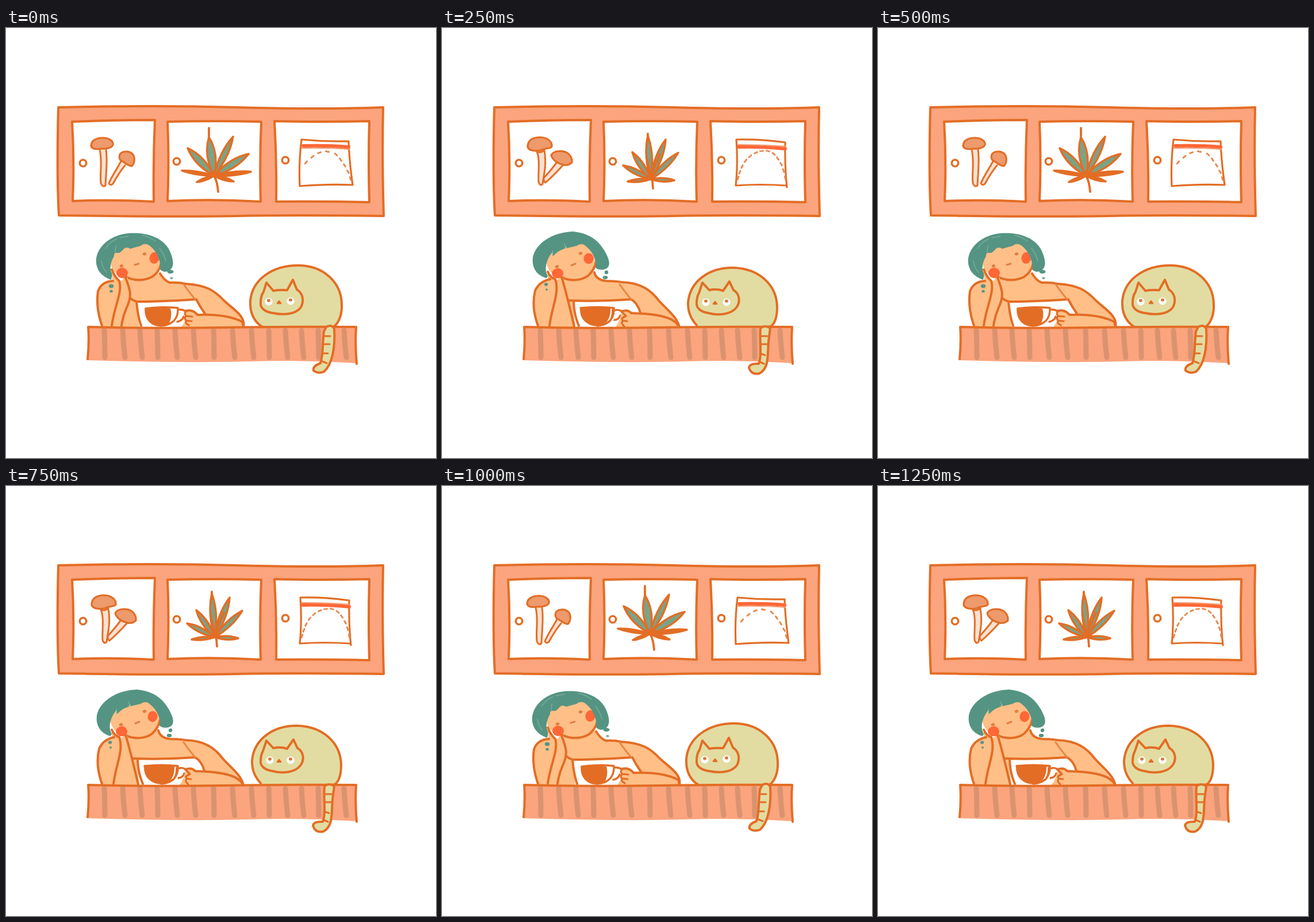
Write an HTML page that moves like this. It is 748x748 px and loops after 1500 ms.

```html
<!DOCTYPE html>
<html lang="en">
<head>
<meta charset="utf-8">
<title>Kitchen counter</title>
<style>
html, body { margin: 0; width: 100%; height: 100%; overflow: hidden; background: #fff; }
svg { display: block; width: 100vw; height: 100vh; }
</style>
</head>
<body>
<svg id="stage" viewBox="0 0 748 748" fill="none" stroke-linecap="round" stroke-linejoin="round"></svg>
<script>
const INK = '#e36d25', SALMON = '#fba47e', SKIN = '#ffbf87', HAIR = '#559482',
      CAT = '#e2dca2', RED = '#ff6737', CAP = '#ed9a6c', STEM = '#fde0d2',
      LEAF = '#7ba386', STRIPE = '#da936f';
const STEP = 250;

const path = (d, fill = 'none', stroke = INK, width = 4) =>
  `<path d="${d}" fill="${fill}" stroke="${stroke}" stroke-width="${width}"/>`;
const line = (d, width = 4, color = INK) => path(d, 'none', color, width);
const shape = (d, fill) => path(d, fill, 'none', 0);
const oval = (x, y, rx, ry, fill, tilt = 0) =>
  `<ellipse cx="${x}" cy="${y}" rx="${rx}" ry="${ry}" fill="${fill}" transform="rotate(${tilt} ${x} ${y})"/>`;

// A pointed leaflet from base to tip; w is the bulge on each side.
function leaflet([bx, by], [tx, ty, w, fill = LEAF, ink = 3.5]) {
  const dx = tx - bx, dy = ty - by, len = Math.hypot(dx, dy);
  const nx = -dy / len * w * 2, ny = dx / len * w * 2;
  const mx = bx + dx * .55, my = by + dy * .55;
  return path(`M${bx} ${by}Q${mx + nx} ${my + ny} ${tx} ${ty}Q${mx - nx} ${my - ny} ${bx} ${by}Z`, fill, INK, ink);
}

const dashes = (list) => list.map(([x, y, angle]) => {
  const a = angle * Math.PI / 180, c = Math.cos(a) * 2.6, s = Math.sin(a) * 2.6;
  return line(`M${x - c} ${y - s}L${x + c} ${y + s}`, 3, '#e58a53');
}).join('');

function cabinet() {
  const frame = 'M91 138Q250 134 400 138T656 138Q654 230 657 327Q500 325 400 327T92 326Q88 260 91 138Z';
  const doors = [
    'M115 163Q190 160 259 160Q256 230 257 302Q180 298 116 301Q119 230 115 163Z',
    'M281 163Q360 161 444 163Q441 235 443 302Q360 297 281 301Q284 230 281 163Z',
    'M467 162Q550 164 632 162Q630 230 632 303Q550 301 470 302Q471 230 467 162Z'];
  const knobs = [[134, 235], [297, 232], [486, 230]];
  return path(frame, SALMON) + doors.map(d => path(d, '#fff')).join('') +
    knobs.map(([x, y]) => `<circle cx="${x}" cy="${y}" r="5.7" stroke="${INK}" stroke-width="3.6"/>`).join('');
}

function counter() {
  const stripes = [171, 203, 233, 263, 294, 326, 361, 394, 427, 457, 486, 514, 543, 588];
  return shape('M143 521H609V583Q520 577 420 580T143 578Z', SALMON) +
    stripes.map((x, i) => line(`M${x} 526Q${x + 1} 550 ${x + (i % 3 ? 4 : 1)} 573`, 9, STRIPE)).join('') +
    line('M142 576Q145 545 143 520Q260 523 380 521T609 520Q607 550 610 584');
}

function mushrooms(p) {
  return path(p.stem2, STEM, INK, 3) + path(p.stem1, STEM, INK, 3) +
    path(p.cap1, CAP, INK, 3.2) + path(p.cap2, CAP, INK, 3.2);
}

function plant(p) {
  return p.tips.map(tip => leaflet(p.base, tip)).join('') + line(p.stalk, 3.8);
}

function bag(p) {
  return line(p.bag, 3.2) + line(p.zip, 6, RED) + line(p.lip, 2, '#f39a70') + dashes(p.dots);
}

function woman(p) {
  return shape(p.torso, SKIN) + shape(p.dress, '#fff') + line(p.dressLine) +
    shape(p.face, SKIN) + line(p.jaw) +
    oval(...p.cheekL, RED) + oval(...p.cheekR, RED, 10) +
    shape(p.hair, HAIR) + line(p.hairMarks, 1.4, '#79ad9c') +
    path(p.arm, SKIN, 'none', 0) + line(p.armLines) +
    oval(202, 426, 8, 8, RED) +
    p.eyes.map(([x, y]) => oval(x, y, 3.3, 2.6, '#df7f42', -15)).join('') +
    line(p.mouth, 3, '#df7f42') + line(p.shoulder) + line('M309 446Q318 459 329 472', 3, '#e8853f') +
    cup(p) + shape(p.forearm, SKIN) + line(p.forearmLines) + line(p.fingers, 3.2) +
    p.drops.map(d => oval(...d)).join('');
}

function cup(p) {
  return shape(p.mug, '#fff') + shape(p.coffee, INK) + line(p.mugLines, 3.4);
}

function cat(p) {
  const eye = ([x, y]) => oval(x, y, 6.7, 6.5, '#fff') + oval(x, y - 2, 3, 2.8, '#dc7a3c');
  return path(p.catBody, CAT) + path(p.catFace, CAT) + p.catEyes.map(eye).join('') +
    path(`M472 ${p.nose + 2}L475 ${p.nose - 2}L478 ${p.nose + 2}Z`, INK, INK, 2.6);
}

const tail = p => path(p.tail, CAT) + line(p.rings, 3.2);

const poseA = {
  cap1: 'M148 205C148 196 157 191 168 191C180 191 187 197 186 203C185 208 175 211 164 210C154 212 149 209 148 205Z',
  stem1: 'M163 212C168 232 163 252 165 270Q168 278 173 274C174 250 177 230 174 212',
  cap2: 'M198 220C201 214 213 213 220 219C225 225 224 235 219 240C213 241 204 232 199 230Q196 225 198 220Z',
  stem2: 'M200 232C193 245 184 258 179 270Q181 275 186 271C192 260 198 250 207 239',
  base: [362, 257],
  tips: [[306, 248, 2.5, INK], [332, 268, 2, INK], [396, 267, 2.5, INK], [426, 250, 3, INK],
         [316, 209, 6], [422, 219, 6], [395, 189, 5], [353, 190, 7]],
  stalk: 'M353 190V174M362 257Q368 268 369 285M354 252L372 252',
  bag: 'M514 194Q555 198 596 197Q597 230 603 273Q560 271 511 275Q509 235 514 194Z',
  zip: 'M517 205Q560 204 596 207', lip: 'M515 209Q560 208 597 211',
  dots: [[522, 234, -50], [533, 224, -40], [545, 217, -22], [559, 215, 12], [574, 220, 42],
         [582, 229, 55], [589, 239, 55], [595, 250, 60], [599, 262, 70]],
  hair: 'M183 438C164 432 155 417 157 401C160 379 182 360 214 357C250 355 275 367 285 388C292 404 293 416 284 422Q275 427 268 420C270 403 261 387 249 378Q241 373 234 379L216 384Q210 380 205 384Q198 393 194 391Q187 390 188 397Q177 416 185 428Z',
  hairMarks: 'M173 384Q181 371 193 367M198 365L213 362M238 361Q252 364 260 371M267 383Q276 395 278 405M166 405Q167 417 175 425M191 379L190 390',
  face: 'M182 410C179 380 200 370 228 370C255 370 272 385 271 404C269 427 250 439 228 439C205 439 185 428 182 410Z',
  jaw: 'M209 433C222 440 241 440 254 433Q266 425 270 410',
  cheekL: [202, 426, 10, 9], cheekR: [258, 400, 8.5, 10],
  eyes: [[201, 414], [241, 393]], mouth: 'M224 412L231 410',
  torso: 'M205 425L262 420Q271 438 283 442L312 445C348 447 365 457 379 474C396 490 415 501 414 520H190Z',
  dress: 'M227 476L331 472L348 498L318 500L305 520H232Z',
  dressLine: 'M216 470Q221 474 227 476Q280 476 331 472Q337 484 346 497M227 476Q229 500 235 518',
  arm: 'M184 424Q190 438 200 440L212 434C212 455 216 475 202 520H167C160 500 157 480 160 460Q166 441 185 439Z',
  armLines: 'M167 518C160 498 157 478 160 458Q166 441 186 440M184 420Q189 433 197 440C203 460 188 485 184 518M207 432C216 455 220 465 210 486Q203 502 201 518',
  shoulder: 'M268 427Q276 440 285 443Q300 442 312 445C348 447 362 456 379 474C396 490 417 501 413 520',
  mug: 'M242 487Q272 484 300 487C300 508 288 519 269 519C252 518 241 506 242 487Z',
  coffee: 'M242 489Q265 484 286 488Q290 502 283 515Q262 522 251 512Q241 502 242 489Z',
  mugLines: 'M243 488Q272 484 299 487C300 505 290 517 270 518C252 518 242 505 243 488M300 490Q307 489 313 493M298 511Q307 509 309 502',
  forearm: 'M313 492L325 493L342 499Q383 500 410 510L414 520H315L310 507Z',
  forearmLines: 'M313 492Q325 489 333 499Q383 497 411 511L413 519',
  fingers: 'M313 493Q309 498 314 501Q308 505 314 509Q310 513 318 517M314 501L324 502M314 509L323 510',
  drops: [[286, 424, 5.5, 3.2, HAIR], [288, 435, 2.8, 2, '#86b5a7'], [183, 449, 4.2, 3.2, HAIR], [183, 458, 2.8, 2.2, HAIR]],
  catBody: 'M446 520C430 510 424 495 425 475C428 437 464 413 508 413C552 413 583 442 584 480C585 500 578 515 568 521',
  catFace: 'M443 478Q443 466 448 459L453 443L465 457Q476 455 489 456L499 438L506 455C517 462 518 474 514 484C506 498 484 500 465 496C450 494 442 487 443 478Z',
  catEyes: [[457, 476], [495, 475]], nose: 477,
  tail: 'M553 528C550 552 552 570 547 583Q533 588 535 596Q543 602 553 598C567 586 573 557 571 523Q567 515 557 520Z',
  rings: 'M555 536H564M554 550H563M552 566H560M548 579L558 583'
};

const poseB = {
  cap1: 'M149 207C149 195 158 190 172 190C184 191 192 198 191 206C189 211 180 208 174 212C164 215 151 214 149 207Z',
  stem1: 'M165 215C171 230 167 250 168 268Q171 276 175 271C178 252 182 235 178 213Q171 218 165 215Z',
  cap2: 'M190 221C194 213 210 212 219 218Q227 224 226 234Q219 240 211 238C202 236 192 230 190 221Z',
  stem2: 'M201 232Q190 247 177 261Q177 268 180 269Q197 254 211 238',
  base: [363, 263],
  tips: [[323, 267, 2.5], [404, 265, 3], [315, 239, 4], [331, 216, 4.5], [411, 217, 4.5],
         [389, 194, 5], [358, 187, 5]],
  stalk: 'M358 196V184M364 258Q367 268 367 279M363 260L356 225M363 258L379 220',
  bag: 'M512 194Q555 193 597 199Q596 240 600 277M512 194Q515 236 511 274Q555 271 598 274',
  zip: 'M516 207Q555 206 597 210', lip: 'M515 203Q558 203 597 206',
  dots: [[515, 261, -72], [518, 251, -65], [522, 241, -62], [528, 231, -52], [536, 223, -42], [546, 217, -24],
         [556, 214, -8], [567, 214, 15], [577, 219, 38], [584, 227, 55], [590, 237, 60], [594, 248, 70], [597, 261, 75]],
  hair: 'M182 435C163 430 156 415 158 399C163 374 193 355 228 354C256 357 272 369 283 388C292 404 294 414 285 419Q275 423 267 417C270 402 260 386 247 377Q241 374 234 379L217 383L215 379L213 384Q202 387 193 397L192 390Q188 394 184 403Q177 420 184 431Z',
  hairMarks: 'M213 375L215 383M192 387L193 396',
  face: 'M182 410C180 382 200 370 228 370C253 370 269 385 268 405C266 427 250 439 228 439C205 439 185 428 182 410Z',
  jaw: 'M207 433C222 441 242 440 254 431Q265 421 268 407',
  cheekL: [201, 427, 10, 8.5], cheekR: [255, 401, 8.5, 9.5],
  eyes: [[200, 415], [241, 392]], mouth: 'M225 413L232 410',
  torso: 'M205 425L260 420Q267 436 283 440L312 442C345 443 362 456 377 474C394 490 409 502 412 520H190Z',
  dress: 'M227 475L331 472L347 496L315 497L302 520H232Z',
  dressLine: 'M220 474Q275 476 329 472Q340 478 345 495M229 477Q230 500 238 518',
  arm: 'M184 424Q190 438 199 438L211 434C214 455 218 475 203 520H167C159 500 157 480 161 459Q168 442 184 437Z',
  armLines: 'M167 518C159 496 157 477 162 457Q169 441 188 437M184 424Q188 434 197 437C205 460 191 485 187 518M208 433C214 452 222 485 230 519',
  shoulder: 'M265 425Q268 438 285 440Q300 440 312 442C347 443 364 457 377 474C391 490 408 501 413 520',
  mug: 'M240 487Q270 483 300 487C300 508 289 519 270 519C252 518 240 506 240 487Z',
  coffee: 'M240 487Q266 484 293 487Q294 505 282 517Q263 522 250 512Q239 503 240 487Z',
  mugLines: 'M241 487Q270 484 299 487C300 505 290 517 270 518M297 490Q297 505 291 511M301 491Q307 489 313 493M300 508Q308 507 310 500',
  forearm: 'M312 493L325 491L340 497Q380 498 403 510L412 520H315L310 507Z',
  forearmLines: 'M312 493Q323 489 329 496Q379 497 399 507Q408 512 412 519',
  fingers: 'M313 494Q318 499 320 501Q310 505 315 509Q310 513 317 519M320 501L313 505M315 509L322 510',
  drops: [[286, 425, 3.2, 3.2, HAIR], [284, 434, 4.3, 3, HAIR], [181, 446, 3.2, 2.7, HAIR], [182, 455, 2, 1.8, HAIR]],
  catBody: 'M443 517C430 503 428 490 428 478C431 441 464 417 505 417C551 418 582 446 583 485C583 503 579 514 572 519L560 521H446',
  catFace: 'M443 478Q443 468 447 461L453 443L465 456Q477 453 489 457L500 441L507 456C518 462 519 476 513 485C504 498 482 501 464 496C450 494 442 487 443 478Z',
  catEyes: [[459, 477], [495, 477]], nose: 478,
  tail: 'M554 522C552 545 557 568 551 584Q535 583 534 591Q538 604 552 601C569 592 566 572 568 545L571 522Q562 516 554 522Z',
  rings: 'M556 536H566M555 550H566M556 567L562 569M553 581L560 584'
};

const scene = p =>
  `<g>${mushrooms(p)}${plant(p)}${bag(p)}${woman(p)}${cat(p)}${counter()}${tail(p)}</g>`;

const stage = document.getElementById('stage');
stage.innerHTML = cabinet() + scene(poseA) + scene(poseB);
const poses = stage.querySelectorAll('g');

function draw(time) {
  const shown = Math.floor(time / STEP) % poses.length;
  poses.forEach((g, i) => g.setAttribute('visibility', i === shown ? 'visible' : 'hidden'));
}

const start = performance.now();
function tick() {
  draw(performance.now() - start);
  requestAnimationFrame(tick);
}
tick();
</script>
</body>
</html>
```
